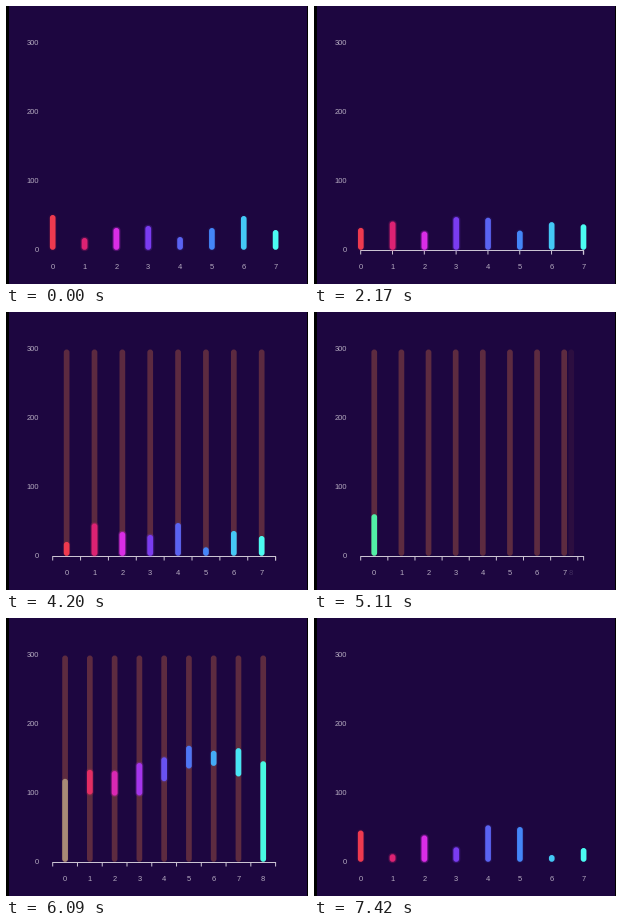
A matplotlib script for the animation above (7.56 s loop, 302 by 278 pixels).

```python
import numpy as np
import matplotlib.pyplot as plt
from matplotlib.animation import FuncAnimation
from matplotlib.colors import to_rgb
from matplotlib.patches import FancyBboxPatch, Rectangle

W, H, DPI = 302, 278, 64
STEP, LOOP, EASE_MS = 70, 7560, 540
PX = 72 / DPI
LEFT, SPAN, BASE, TOP = 46.7, 222.9, 243.8, 37.5
BAR = 5.7

RED, CRIMSON, MAGENTA, PURPLE = "#ee3a4f", "#dc2273", "#d92de6", "#7a3cf0"
INDIGO, BLUE, SKY, AQUA = "#5a63f2", "#4486f8", "#44c8f6", "#4bfbf2"
GREEN, MINT = "#52eea6", "#46f7d5"
GLOW = {RED: .04, CRIMSON: .18, MAGENTA: .2, PURPLE: .16, INDIGO: .06,
        BLUE: .04, SKY: .02, AQUA: 0, GREEN: 0, MINT: 0}
PALETTE = [RED, CRIMSON, MAGENTA, PURPLE, INDIGO, BLUE, SKY, AQUA]


def at(fractions):
    return LEFT + SPAN * np.minimum(np.asarray(fractions, float), 1)


def state(layout, tops, bottoms=None, colors=None, back=0., line=1.):
    """Bars, ticks and labels of one chart; always nine bar slots."""
    k = np.arange(10)
    if layout == "points":
        x, ticks = at(k[:8] / 7), at(k / 7)
    else:
        x, ticks = at((k[:layout] + .5) / layout), at(k / layout)
    n = len(x)
    x = np.append(x, at([8.5 / 9]))[:9]
    tops = np.append(tops, [BASE] * (9 - n)).astype(float)
    bottoms = np.full(9, float(BASE)) if bottoms is None else np.array(bottoms, float)
    colors = colors or PALETTE + [MINT]
    paint = np.array([(*to_rgb(c), GLOW[c]) for c in colors])
    return dict(x=x, ticks=ticks, top=tops, bottom=bottoms, paint=paint,
                ninth=float(n == 9), back=back, line=line)


plain = state("points", [209, 232, 222, 220, 231, 222, 210, 224], line=0.)
lined = state("points", [222, 215.5, 225.5, 211, 211.7, 224.5, 216.2, 218.3])
banded = state(8, [209.3, 224.5, 240.5, 218, 214.2, 234.2, 207, 217])
tracked = state(8, [230, 211.5, 220, 223, 211, 235.3, 219, 224], back=1.)

drops = [66.5, 102, 124, 156.4, 164.7, 181.5, 209.7, 239, BASE]
falling = state(9, [67] + drops[:-1], [BASE] + drops[1:], [GREEN] + PALETTE, back=1.)

climbs = [BASE, 236.5, 220.7, 194.3, 162, 125.5, 98, 93.5, 66]
rising = state(9, climbs[1:] + [66], climbs[:-1] + [BASE], back=1.)

final = state("points", [212.5, 236.3, 217.5, 229.3, 207.3, 209, 237, 230], line=0.)

# The falling steps unfold from one level far below the axis.
below = np.array([BASE] + [BASE + 177] * 8, float)
unfold = dict(tracked, top=below, bottom=below, paint=falling["paint"])

SCENES = [(-EASE_MS, plain, plain), (1050, plain, lined), (2170, lined, banded),
          (3780, banded, tracked), (4970, unfold, falling),
          (5880, falling, rising), (6930, rising, final)]


def cubic_in_out(t):
    return 4 * t ** 3 if t < .5 else 1 - 4 * (1 - t) ** 3


def pose(ms):
    start, a, b = [s for s in SCENES if s[0] <= ms][-1]
    e = cubic_in_out(min(1, (ms - start + STEP) / EASE_MS))
    return {key: a[key] + (b[key] - a[key]) * e for key in a}


fig = plt.figure(figsize=(W / DPI, H / DPI), dpi=DPI, facecolor="black")
ax = fig.add_axes([0, 0, 1, 1])
ax.set_xlim(0, W)
ax.set_ylim(H, 0)
ax.axis("off")
ax.add_patch(Rectangle((3, -2), 298, H + 4, fc="#1d0640", ec="none", zorder=0))


def label(x, y, text, ha):
    return ax.text(x, y, text, ha=ha, va="center", family="Liberation Sans",
                   size=7.5 * PX, color="#b5abc0", zorder=5)


def bar_of_axis(x, y, w, h):
    return ax.add_patch(Rectangle((x, y), w, h, fc="#cbc4d3", ec="none",
                                  snap=False, zorder=2))


for value, y in zip((300, 200, 100, 0), (37.8, 106.5, 175.3, 244)):
    label(33.3, y, str(value), "right")
names = [label(0, 261.5, str(k), "center") for k in range(9)]

axis_line = bar_of_axis(LEFT - .5, 244, SPAN + 1, 1)
tick_marks = [bar_of_axis(0, 245, 1, 3.5) for _ in range(10)]
moving = []


def pill(x, top, bottom, color, alpha, z, grow=0.):
    w, h = BAR + 2 * grow, bottom - top + 2 * grow
    if h < .2 or alpha < .004:
        return
    r = min(w, h) / 2
    p = FancyBboxPatch((x - w / 2, top - grow), w, h, fc=color, ec="none",
                       alpha=alpha, zorder=z, snap=False,
                       boxstyle=f"round,pad=0,rounding_size={r}")
    moving.append(ax.add_patch(p))


def draw(i):
    while moving:
        moving.pop().remove()
    s = pose(i * STEP)
    axis_line.set_alpha(s["line"])
    for tick, x in zip(tick_marks, s["ticks"]):
        tick.set_x(x - .5)
        tick.set_alpha(s["line"])
    for k in range(9):
        x, top, bottom = s["x"][k], s["top"][k], s["bottom"][k]
        shown = s["ninth"] if k == 8 else 1.
        names[k].set_x(x)
        names[k].set_alpha(shown)
        pill(x, TOP, BASE, "#5d2b40", s["back"] * shown, 1)
        rgb, glow = s["paint"][k][:3], s["paint"][k][3]
        if bottom - top > .2:
            for grow in (1.4, .7):
                pill(x, top, bottom, rgb, glow * shown, 3, grow)
        pill(x, top, bottom, rgb, shown, 4)
    return []


anim = FuncAnimation(fig, draw, frames=LOOP // STEP, interval=STEP,
                     init_func=lambda: draw(0), repeat=True, repeat_delay=0,
                     blit=False)
plt.show()
```
